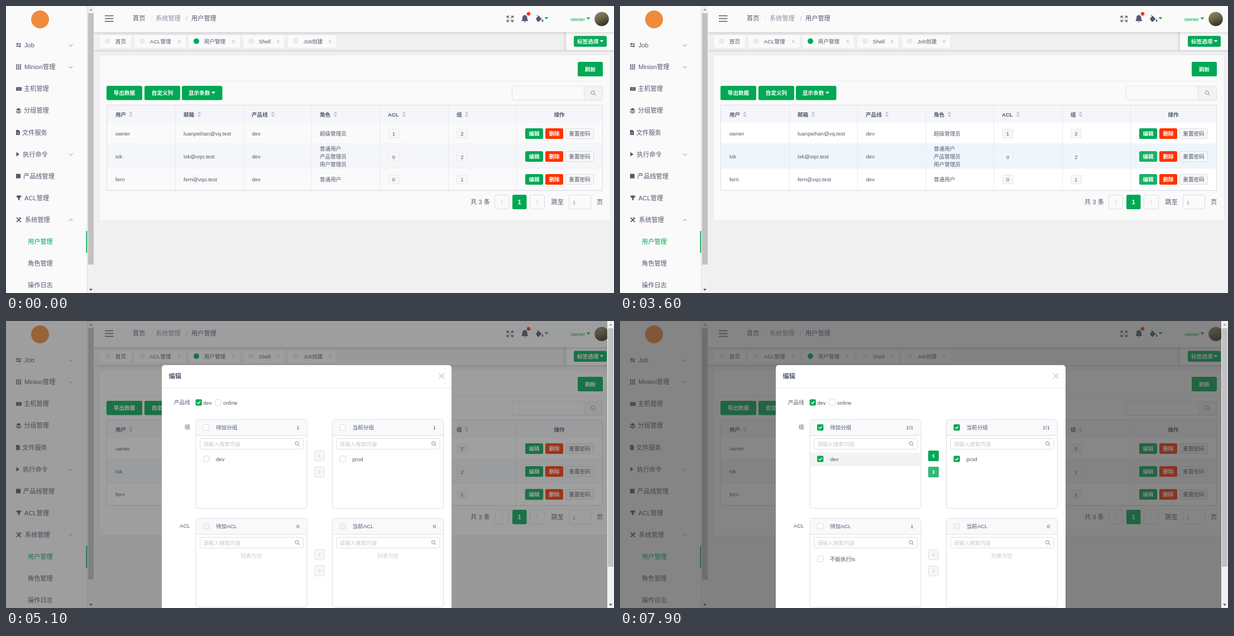
These frames come from a looping animation (1089 by 514 pixels, 8 s). An HTML page:

```html
<!DOCTYPE html>
<html lang="zh-CN">
<head>
<meta charset="utf-8">
<title>用户管理</title>
<style>
html, body { margin: 0; width: 100%; height: 100%; overflow: hidden; background: #f0f0f1; }
svg { display: block; width: 1089px; height: 514px; }
text { font-family: "Liberation Sans", "Noto Sans CJK SC", "Noto Sans CJK", sans-serif; white-space: pre; }
.modal { transform-origin: 538.5px 339px; }
</style>
</head>
<body>
<svg id="stage" viewBox="0 0 1089 514" xmlns="http://www.w3.org/2000/svg"></svg>
<script>
const GREEN = '#00a854', HOVER = '#33b976', RED = '#ff3300';
const INK = '#515a6e', PALE = '#c5c8ce', LINE = '#dcdee2', SOFT = '#e8eaec', CARD = '#fafafa';
const LOOP = 8000, BOX = 11.2;
let css = '', count = 0;

// Stepped keyframes from [time, value] pairs.
function anim(prop, ...keys) {
  const name = 'k' + count++;
  const body = keys.map(([t, v]) => `${t / LOOP * 100}%{${prop}:${v}}`).join('');
  css += `@keyframes ${name}{${body}}`;
  return `style="animation:${name} ${LOOP}ms step-end infinite"`;
}
const show = (from, to, body) =>
  `<g ${anim('opacity', [0, 0], [from, 1], [to, 0])}>${body}</g>`;

function rect(x, y, w, h, fill, stroke, r = 0, extra = '') {
  const o = stroke ? 0.5 : 0;
  return `<rect x="${x + o}" y="${y + o}" width="${w - 2 * o}" height="${h - 2 * o}" rx="${r}" fill="${fill}" stroke="${stroke || 'none'}" ${extra}/>`;
}
const text = (x, cy, s, fill = INK, size = 9.6, extra = '') =>
  `<text x="${x}" y="${cy + size * 0.37}" font-size="${size}" fill="${fill}" ${extra}>${s}</text>`;
const MID = 'text-anchor="middle" ', END = 'text-anchor="end" ', BOLD = 'font-weight="700" ';
const line = (d, stroke = INK, w = 1) =>
  `<path d="${d}" fill="none" stroke="${stroke}" stroke-width="${w}"/>`;
const shape = (d, fill = INK) => `<path d="${d}" fill="${fill}"/>`;
const dot = (x, y, r, fill) => `<circle cx="${x}" cy="${y}" r="${r}" fill="${fill}"/>`;
const caret = (x, y, fill) => shape(`M${x - 3.5} ${y - 2}h7l-3.5 4z`, fill);
const cross = (x, y, r, c, w = 1) =>
  line(`M${x - r} ${y - r}l${2 * r} ${2 * r}m0 ${-2 * r}l${-2 * r} ${2 * r}`, c, w);
const chevron = (x, y, dx, dy, c, w = 1) => dx
  ? line(`M${x - dx / 2} ${y - 3}l${dx} 3l${-dx} 3`, c, w)
  : line(`M${x - 3.5} ${y - dy / 2}l3.5 ${dy}l3.5 ${-dy}`, c, w);
const lens = (x, y, c) =>
  `<circle cx="${x - 0.8}" cy="${y - 0.8}" r="3.1" fill="none" stroke="${c}"/>` + line(`M${x + 1.5} ${y + 1.5}l2.7 2.7`, c);
const button = (x, y, w, h, s, fill = GREEN, extra = '') =>
  rect(x, y, w, h, fill, '', 2.5, extra) + text(x + w / 2, y + h / 2, s, '#fff', 9.6, MID + BOLD);

function scrollbar(x, w, end) {
  const c = x + w / 2;
  return rect(x, 0, w, 514, '#f1f1f1') + rect(x + 1, 13, w - 2, end - 13, '#c1c1c1') +
    shape(`M${c - 3} 8h6l-3 -3.5z`, '#a3a3a3') + shape(`M${c - 3} 506.5h6l-3 3.5z`, '#505050');
}

function sidebar() {
  const icons = [
    y => line(`M19 ${y - 2}h8M18 ${y + 2}h8`, INK, 1.3) + shape(`M21 ${y - 4.5}v5l-3 -2.5zM24 ${y - 0.5}v5l3 -2.5z`),
    y => [0, 1, 2].map(i => [0, 1, 2].map(j => rect(18 + i * 3.4, y - 4.5 + j * 3.4, 2.3, 2.3, INK)).join('')).join(''),
    y => rect(18, y - 3, 10, 6.5, INK, '', 1) + line(`M20 ${y - 1}h6M20 ${y + 1.3}h6`, '#aab', 0.8),
    y => shape(`M18 ${y - 2}l4.5 -2.5l4.5 2.5l-4.5 2.5z`) + line(`M18 ${y + 0.5}l4.5 2.3l4.5 -2.3M18 ${y + 2.6}l4.5 2.3l4.5 -2.3`, INK, 1.1),
    y => shape(`M18 ${y - 4.5}h4.5l2.5 2.5v6.5h-7z`) + line(`M19.5 ${y}h4M19.5 ${y + 2}h4`, '#dde', 0.7),
    y => shape(`M18.5 ${y - 4}l5.5 4l-5.5 4z`),
    y => rect(18, y - 4, 8, 8, INK),
    y => shape(`M18 ${y - 3.5}q5 -2 10 0l-3.7 4.5v3.5l-2.6 -1v-2.5z`),
    y => line(`M19 ${y + 4}l7 -7M19 ${y - 4}l7.5 8`, INK, 1.7) + line(`M24 ${y - 4.5}l3 3`, INK, 1.6)
  ];
  const items = [['Job', 33, 1], ['Minion管理', 33, 1], ['主机管理', 32], ['分组管理', 32], ['文件服务', 29],
    ['执行命令', 30, 1], ['产品线管理', 31], ['ACL管理', 33], ['系统管理', 34, -1],
    ['用户管理', 39], ['角色管理', 39], ['操作日志', 39]];
  return rect(0, 0, 146, 514, CARD) + rect(145, 0, 1, 514, LINE) + dot(61, 24, 16, '#ef8b3c') +
    items.map(([s, x, fold], i) => {
      const y = 70 + i * 39.1;
      return (icons[i] ? icons[i](y) : '') + text(x, y, s, i === 9 ? GREEN : INK, 11.2) +
        (fold ? chevron(116, y + 0.5, 0, 3.5 * fold, '#80879a') : '');
    }).join('') +
    rect(143.5, 403, 1.8, 39, GREEN) + scrollbar(146, 12, 463);
}

function header() {
  const corners = [[-1, -1], [1, -1], [-1, 1], [1, 1]].map(([a, b]) =>
    line(`M${902.8 + a * 1.5} ${23 + b * 1.5}l${a * 3.5} ${b * 3.5}m${-a * 3.3} 0h${a * 3.8}v${-b * 3.8}`, INK, 1.2)).join('');
  return rect(158, 47, 931, 5, 'url(#drop)') + rect(158, 0, 931, 47, CARD) +
    line('M177 17.5h15.5M177 22.5h15.5M177 27.5h15.5', INK, 1.4) +
    text(227, 21.5, '首页', INK, 11.2) + text(259.5, 21.5, '/', LINE, 11.2) +
    text(268, 21.5, '系统管理', '#8a90a0', 11.2) + text(322, 21.5, '/', '#b8bcc5', 11.2) +
    text(332, 21.5, '用户管理', INK, 11.2, 'font-weight="500"') + corners +
    shape('M923 27q2 -1.5 2 -6q0 -4 4.3 -5q4.3 1 4.3 5q0 4.5 2 6zM927.5 28h3.6q-1.8 2.5 -3.6 0z') +
    dot(936, 14, 3.2, RED) +
    shape('M949 22.5l5 -5l5.5 5.5l-5 5q-1.5 .8 -3 -.8zM961 23.5q3 4 0 5q-3 -1 0 -5z') + line('M951 16.5l4 3', INK, 1.2) +
    caret(968, 22, GREEN) + text(1011, 23, 'owner', GREEN) + caret(1043, 22.5, GREEN) +
    dot(1067, 23.3, 12.8, 'url(#avatar)');
}

function tabs() {
  const list = [[167, 58, '首页'], [229, 94, 'ACL管理'], [326, 94, '用户管理'], [424, 76, 'Shell'], [504, 89, 'Job创建']];
  return rect(158, 79, 931, 4, 'url(#drop)') + list.map(([x, w, s], i) =>
    rect(x, 51, w, 25, CARD, SOFT, 2) + dot(x + 15, 63, 5, i === 2 ? GREEN : SOFT) +
    text(x + 28.8, 63.5, s) + (i ? cross(x + w - 12.5, 63.5, 2.4, '#a0a5b0', 0.9) : '')).join('') +
    rect(997, 47, 6, 32, 'url(#side)') + rect(1003, 47, 86, 32, CARD) +
    rect(1017, 53.5, 59, 19.5, GREEN, '', 2.5, anim('fill', [0, '#08ab5a'], [500, GREEN])) +
    text(1023, 63, '标签选项', '#fff', 9.6, BOLD) + caret(1067, 63, '#fff');
}

function table() {
  const edges = [181, 303, 425, 547, 669, 792, 914];
  const heads = ['用户', '邮箱', '产品线', '角色', 'ACL', '组'];
  const sortX = [223.5, 346, 478, 590, 713, 825];
  const tops = [209, 247, 291, 330], mids = [228.3, 269.7, 310.5];
  const hot = '#e8f6ff', warm = '#1ab165';
  const fills = [
    anim('fill', [0, CARD], [900, '#fff']),
    anim('fill', [0, '#f5f6f9'], [3600, '#eef6fc'], [3700, hot], [4500, '#f5f6f9']),
    anim('fill', [0, CARD], [2100, '#f0f9ff'], [2200, hot], [3600, '#fff'], [4500, '#f0f9ff'], [4600, hot], [5100, '#fff'])
  ];
  const edits = ['',
    anim('fill', [0, GREEN], [3600, warm], [3700, HOVER], [4500, warm], [4600, GREEN]),
    anim('fill', [0, GREEN], [2500, warm], [2600, HOVER], [3600, warm], [3700, GREEN], [4500, warm], [4600, HOVER], [4800, '#0aa353'], [5100, GREEN])];
  const rows = [
    ['owner', 'luanpeihan@vq.test', ['超级管理员'], 1, 2],
    ['txk', 'txk@vqo.test', ['普通用户', '产品管理员', '用户管理员'], 0, 2],
    ['fern', 'fern@vqo.test', ['普通用户'], 0, 1]
  ];
  const badge = (x, y, n) => rect(x, y - 8.5, 20, 17, '#f7f7f7', SOFT, 2) + text(x + 10, y + 0.3, n, INK, 9.6, MID);
  const body = rows.map(([user, mail, roles, acl, group], i) => {
    const y = mids[i], top = Math.round(y - 9.5);
    return rect(181, tops[i], 888, tops[i + 1] - tops[i], CARD, '', 0, fills[i]) +
      rect(181, tops[i + 1] - 0.5, 888, 1, SOFT) +
      text(196, y, user) + text(318, y, mail) + text(440.5, y, 'dev') +
      roles.map((s, j) => text(562, y + (j - (roles.length - 1) / 2) * 14.2, s)).join('') +
      badge(684.5, y, acl) + badge(807, y, group) +
      (i === 2 ? rect(928.5, top - 1.5, 35, 22, GREEN, '', 3.5, anim('opacity', [0, 0], [4700, 0.2], [6600, 0.1], [6700, 0])) : '') +
      button(930, top, 32, 19, '编辑', GREEN, edits[i]) + button(966, top, 32, 19, '删除', RED) +
      rect(1002, top, 51, 19, '#f7f7f7', LINE, 2.5) + text(1027.5, y, '重置密码', INK, 9.6, MID);
  }).join('');
  return rect(181, 178, 888, 31, '#f5f6f9') + rect(181, 209, 888, 1, SOFT) + body +
    heads.map((s, i) => text(edges[i] + 15, 194, s, INK, 9.6, BOLD) +
      shape(`M${sortX[i] - 3.5} 193h7l-3.5 -4zm0 2h7l-3.5 4z`, PALE)).join('') +
    text(991, 194, '操作', INK, 9.6, MID + BOLD) +
    edges.slice(1).map(x => rect(x, 178, 1, 152, SOFT)).join('') + rect(180, 177, 889, 154, 'none', LINE);
}

function page() {
  const cell = (x, w, fill, stroke) => rect(x, 338, w, 26, fill, stroke, 2.5);
  return rect(158, 79, 931, 435, '#f0f0f1') + rect(167, 87, 916, 298, CARD, '#e6e7ea', 2) +
    button(1024, 100, 45, 26, '刷新') + rect(181, 134, 888, 1, SOFT) +
    button(180, 143, 64, 25.5, '导出数据') + button(248, 143, 64, 25.5, '自定义列') +
    rect(315, 143, 72.5, 25.5, GREEN, '', 2.5) + text(327, 155.75, '显示条数', '#fff', 9.6, BOLD) + caret(371.5, 155.5, '#fff') +
    rect(906, 143.5, 163, 25.5, '#f3f3f4', LINE, 2.5) + rect(907, 144.5, 128, 23.5, CARD, '', 2) + rect(1035, 144, 1, 25, LINE) +
    lens(1052, 156, '#80879a') + table() +
    text(832, 351, '共 3 条', INK, 11.2) +
    cell(875, 26, CARD, LINE) + chevron(888, 351, -3.5, 0, PALE) +
    cell(907, 25.5, GREEN) + text(919.7, 351.3, '1', '#fff', 11.2, MID + BOLD) +
    cell(938, 27, CARD, LINE) + chevron(951.5, 351, 3.5, 0, PALE) +
    text(976.5, 351, '跳至', INK, 11.2) + cell(1008, 40, CARD, LINE) + text(1015, 351.3, '1', '#80879a') +
    text(1058, 351, '页', INK, 11.2);
}

const box = (x, y, fill) => rect(x, y, BOX, BOX, fill, LINE, 1.8);
const tick = (x, y) => rect(x, y, BOX, BOX, GREEN, '', 1.8) + line(`M${x + 2.9} ${y + 5.6}l2.1 2.2l3.6 -4.2`, '#fff', 1.4);
const check = (x, y, ready, done) => box(x, y, '#f3f3f3') +
  (ready ? show(ready, LOOP, box(x, y, '#fff')) : '') +
  (done ? `<g ${anim('opacity', [0, 0], [done, 0.6], [done + 100, 1])}>${tick(x, y)}</g>` : '');

// One transfer list: load, done and all are the times it fills, its item is ticked and its header follows.
function list({ x, y, title, item, load, done, all, hover = [] }) {
  const num = (from, to, s) => show(from, to, text(x + 186, y + 14.5, s, INK, 9.6, END));
  const itemY = y + (done ? 71 : 73);
  return rect(x, y, 200, 160, '#fff', LINE, 4) + rect(x + 1, y + 1, 198, 28, '#f8f9fb', '', 3) + rect(x, y + 28.5, 200, 1, LINE) +
    check(x + 13.6, y + 9, load, all) + text(x + 36.5, y + 14.5, title) +
    num(0, load || LOOP, '0') + (load ? num(load, all || LOOP, '1') : '') + (all ? num(all, LOOP, '1/1') : '') +
    rect(x + 7.5, y + 34, 186, 20, '#fff', LINE, 2.5) + text(x + 13.5, y + 44, '请输入搜索内容', PALE) + lens(x + 182.5, y + 44, '#80879a') +
    show(0, load || LOOP, text(x + 100, y + 67, '列表为空', PALE, 9.6, MID)) +
    hover.map(([a, b]) => show(a, b, rect(x + 1, y + 60, 198, 24, '#f3f3f3'))).join('') +
    (item ? show(load, LOOP, check(x + 13.6, itemY - 5.6, load, done) + text(x + 36.5, itemY, item)) : '');
}

function mover(y, dir, keys) {
  const arrow = (c, w) => chevron(561.5, y + 9.5, 3 * dir, 0, c, w);
  return rect(552, y, 19, 19, '#f7f7f7', LINE, 2) + arrow('#b4b8c0') +
    (keys ? show(keys[0][0], LOOP, rect(552, y, 19, 19, GREEN, '', 2, anim('fill', [0, '#a6dec1'], ...keys)) + arrow('#fff', 1.4)) : '');
}

function modal() {
  const content = rect(279, 79, 519, 521, '#fff', '', 5) +
    text(291.5, 98.5, '编辑', INK, 11.2, BOLD) + cross(780.5, 98.5, 4.5, '#999') + rect(279, 119, 519, 1, SOFT) +
    text(301, 145.5, '产品线') + tick(339.6, 140.2) + text(353, 146, 'dev') +
    box(374.7, 140.2, '#fff') + text(389, 146, 'online') +
    text(320, 189, '组') + text(311, 366.5, 'ACL') +
    list({ x: 339.5, y: 176, title: '待加分组', item: 'dev', load: 5100, done: 7400, all: 7600, hover: [[5700, 6100], [7000, LOOP]] }) +
    list({ x: 584, y: 176, title: '当前分组', item: 'prod', load: 5100, done: 6600, all: 6900, hover: [[6300, 6900]] }) +
    list({ x: 339.5, y: 353, title: '待加ACL', item: '不能执行ls', load: 5300 }) +
    list({ x: 584, y: 353, title: '当前ACL' }) +
    mover(232, -1, [[6900, '#66cb98'], [7000, GREEN]]) +
    mover(261, 1, [[7600, '#66cb98'], [7700, GREEN], [7900, HOVER]]) + mover(409, -1) + mover(438, 1);
  const scale = anim('transform', [0, 'scale(.95)'], [5100, 'scale(1)']);
  const fade = anim('opacity', [0, 0], [5000, 0.65], [5100, 1]);
  const dim = anim('opacity', [0, 0], [5000, 0.17], [5100, 0.47], [5200, 0.58], [5300, 0.6]);
  return rect(0, 0, 1089, 514, '#373737', '', 0, dim) +
    `<g ${fade}><g class="modal" ${scale}>${content}</g></g>` + show(5000, LOOP, scrollbar(1077, 12, 440));
}

const defs = `<defs>
  <linearGradient id="drop" x2="0" y2="1"><stop stop-opacity=".12"/><stop offset="1" stop-opacity="0"/></linearGradient>
  <linearGradient id="side"><stop stop-opacity="0"/><stop offset="1" stop-opacity=".1"/></linearGradient>
  <linearGradient id="avatar" x2=".4" y2="1"><stop stop-color="#8f9078"/><stop offset=".5" stop-color="#6f6a48"/><stop offset="1" stop-color="#33382c"/></linearGradient>
</defs>`;
const art = defs + page() + rect(158, 47, 931, 32, '#f0f0f1') + tabs() + header() + sidebar() + modal();
const style = document.createElement('style');
style.textContent = css;
document.head.append(style);
document.getElementById('stage').innerHTML = art;
</script>
</body>
</html>
```
